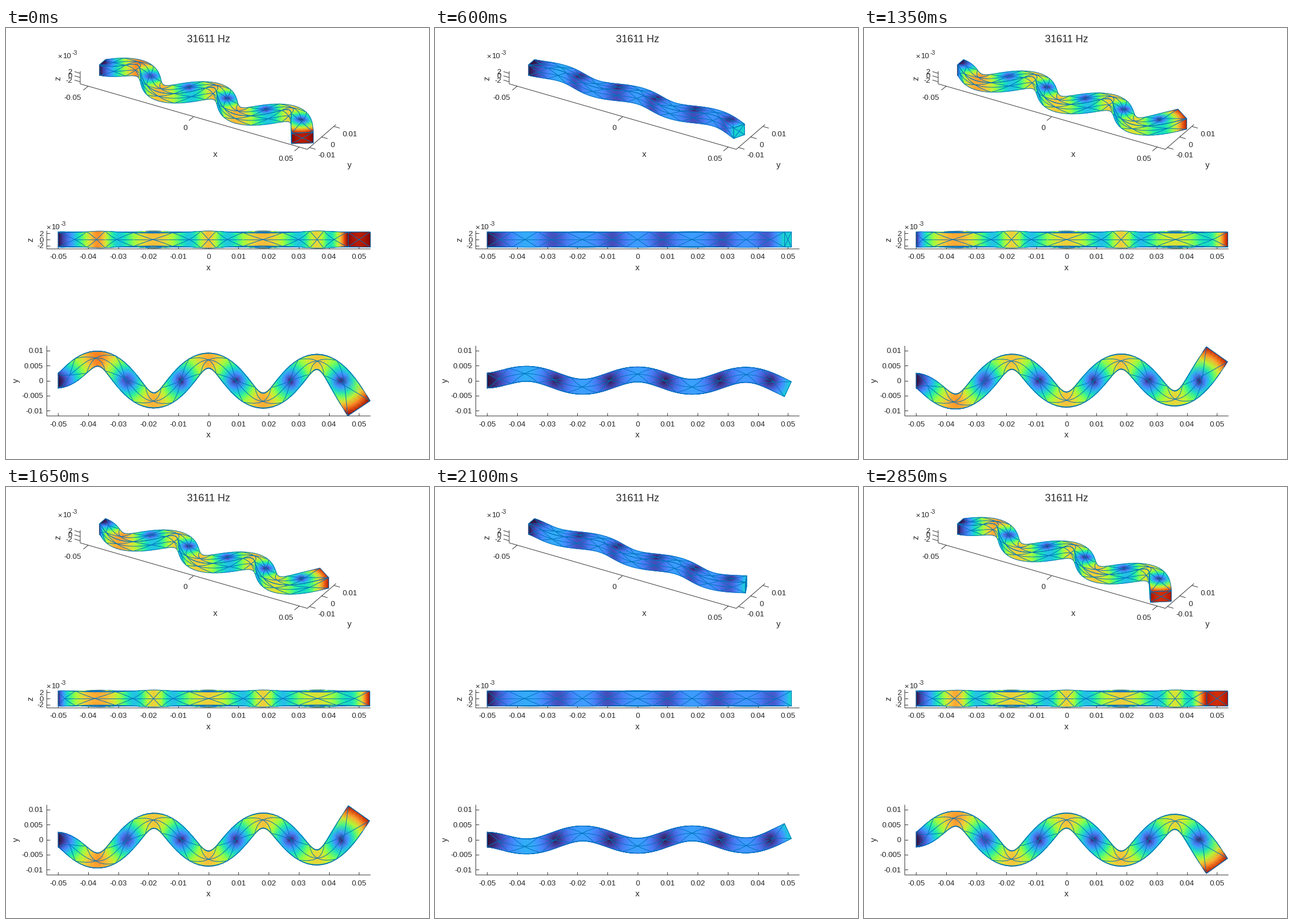
These frames come from a looping animation (741x756 px, 3000 ms). A matplotlib script:

```python
import numpy as np
import matplotlib.pyplot as plt
from matplotlib.animation import FuncAnimation
from matplotlib.collections import LineCollection, TriMesh
from matplotlib.tri import Triangulation

W, H = 741, 756
FRAMES, INTERVAL = 20, 150
PX = 0.72  # points per pixel at 100 dpi
INK = "#262626"
EDGE = "#0072bd"

plt.rcParams["font.family"] = "Liberation Sans"
fig = plt.figure(figsize=(W / 100, H / 100), dpi=100, facecolor="white")
ax = fig.add_axes([0, 0, 1, 1])
ax.set(xlim=(0, W), ylim=(H, 0))
ax.axis("off")

# Beam, in metres
HALF_LEN, HALF = 0.05, 0.0025
CELLS = np.array([-50, -42.4, -32.6, -22.9, -13.8, -4.5,
                  4.5, 13.5, 22.7, 31.8, 40.5, 50]) / 1000
K = 5.5 * np.pi / (2 * HALF_LEN)
AMP, TIP, SHEAR, POISSON = 0.00475, 0.937, 0.93, 0.3
PEAK = 0.01

# Axis limits of the plots
XL, YL, ZL = 0.0538, 0.01175, 0.003

# Views: rows give screen x, screen y (down) and nearness
S2, S3 = 5270, 4270
C, S = np.cos(np.pi / 6), 0.5
VIEWS = [
    (S3 * np.array([[C, S, 0], [S * S, -C * S, -C], [S * C, -C * C, S]]),
     (354, 122.6, 0)),
    (S2 * np.array([[1, 0, 0], [0, 0, -1], [0, -1, 0]]), (354.7, 371, 0)),
    (S2 * np.array([[1, 0, 0], [0, -1, 0], [0, 0, 1]]), (354.7, 618.5, 0)),
]


def deform(x, y, z, c):
    """Displaced point and relative displacement at phase factor c."""
    t = K * (x + HALF_LEN)
    free = TIP * np.exp(-K * (HALF_LEN - x))
    sin, cos, root = np.sin(t), np.cos(t), np.exp(-t)
    defl = AMP * (sin - cos + np.exp(-0.85 * t) - free)
    turn = SHEAR * AMP * K * (cos + sin - root - free)
    bend = SHEAR * AMP * K**2 * (cos - sin + root - free) * (1 - root)
    u = -y * turn
    v = defl + POISSON * bend * (y * y - z * z) / 2
    w = POISSON * bend * y * z
    size = abs(c) * np.sqrt(u * u + v * v + w * w) / PEAK
    return np.array([x + c * u, y + c * v, z + c * w]), size


def project(view, pts):
    m, off = view
    return np.tensordot(m, pts, 1) + np.reshape(off, (3,) + (1,) * (pts.ndim - 1))


def side(k):
    """Long face k as a map from (along, across) to a point of the beam."""
    def surface(p, q):
        y, z = q, np.full_like(q, HALF)
        for _ in range(k):
            y, z = -z, y
        return p, y, z
    return surface


def end_face(p, q):
    return np.full_like(p, HALF_LEN), p, q


def line(p0, q0, p1, q1, n=9):
    f = np.linspace(0, 1, n)
    return p0 + (p1 - p0) * f, q0 + (q1 - q0) * f


def cell_patches(i):
    """(surface, p range, mesh lines) for each face of one cell."""
    a, b = CELLS[i], CELLS[i + 1]
    mid, h = (a + b) / 2, HALF
    first, last = i == 0, i == len(CELLS) - 2
    lines = [line(a, -h, b, h), line(a, h, b, -h),
             line(a, -h, b, -h), line(a, h, b, h),
             line(mid if first else a, 0, mid if last else b, 0)]
    if first:
        lines.append(line(a, -h, a, h))
    if last:
        lines.append(line(b, -h, b, h))
    patches = [(side(k), (a, b), lines) for k in range(4)]
    if last:
        cap = [line(-h, -h, h, h), line(-h, h, h, -h),
               line(-h, -h, h, -h), line(-h, h, h, h),
               line(-h, -h, -h, h), line(h, -h, h, h)]
        patches.append((end_face, (-h, h), cap))
    return patches


NP, NQ = 9, 7
ids = np.arange(NP * NQ).reshape(NP, NQ)
c00, c10, c11, c01 = (g.ravel() for g in
                      (ids[:-1, :-1], ids[1:, :-1], ids[1:, 1:], ids[:-1, 1:]))
TRIS = np.concatenate([np.column_stack([c00, c10, c11]),
                       np.column_stack([c00, c11, c01])])


def cross_up(ax_, ay, bx, by):
    return ay * bx - ax_ * by


def face_fill(surface, span, view, c):
    p, q = np.meshgrid(np.linspace(*span, NP), np.linspace(-HALF, HALF, NQ),
                       indexing="ij")
    pts, size = deform(*surface(p.ravel(), q.ravel()), c)
    sx, sy, _ = project(view, pts)
    a, b, d = TRIS.T
    area = cross_up(sx[b] - sx[a], sy[b] - sy[a], sx[d] - sx[a], sy[d] - sy[a])
    return sx, sy, size, TRIS[area > 0.05]


def face_lines(surface, lines, view, c):
    p = np.array([l[0] for l in lines])
    q = np.array([l[1] for l in lines])

    def at(p, q):
        return project(view, deform(*surface(p, q), c)[0])[:2]

    pm, qm = (p[:, 1:] + p[:, :-1]) / 2, (q[:, 1:] + q[:, :-1]) / 2
    e = 1e-5
    base = at(pm, qm)
    dp, dq = (at(pm + e, qm) - base) / e, (at(pm, qm + e) - base) / e
    front = cross_up(*dp, *dq) > 0.01 * S3**2
    s = at(p, q)
    segs = np.stack([s[:, :, :-1], s[:, :, 1:]], axis=-1)
    return [seg.T for seg in np.moveaxis(segs, 0, 2)[front]]


PATCHES = [cell_patches(i) for i in range(len(CELLS) - 1)]
drawn = []


def draw_cell(i, view, c, z):
    xs, ys, sizes, tris, segs = [], [], [], [], []
    for n, (surface, span, lines) in enumerate(PATCHES[i]):
        sx, sy, size, tri = face_fill(surface, span, view, c)
        xs.append(sx)
        ys.append(sy)
        sizes.append(size)
        tris.append(tri + n * NP * NQ)
        segs += face_lines(surface, lines, view, c)
    tri = np.concatenate(tris)
    if len(tri):
        mesh = TriMesh(Triangulation(np.concatenate(xs), np.concatenate(ys), tri),
                       cmap="turbo", zorder=z)
        mesh.set_array(np.concatenate(sizes))
        mesh.set_clim(0, 1)
        drawn.append(ax.add_collection(mesh, autolim=False))
    if segs:
        edges = LineCollection(segs, colors=EDGE, linewidths=0.95 * PX,
                               capstyle="round", zorder=z + 0.5)
        drawn.append(ax.add_collection(edges, autolim=False))


def update(frame):
    while drawn:
        drawn.pop().remove()
    c = np.cos(2 * np.pi * frame / FRAMES)
    mids = (CELLS[1:] + CELLS[:-1]) / 2
    centre, _ = deform(mids, 0 * mids, 0 * mids, c)
    for view in VIEWS:
        order = np.argsort(project(view, centre)[2], kind="stable")
        for rank, i in enumerate(order):
            draw_cell(i, view, c, 2 + rank)
    return drawn


def text(x, y, s, size=13.33, ha="center", color=INK):
    """Text whose digits are centred on height y."""
    ax.text(x, y + 0.345 * size, s, fontsize=size * PX, ha=ha, va="baseline",
            color=color)


def name(x, y, s, rotation=0):
    ax.text(x, y, s, fontsize=14.67 * PX, ha="center", color=INK,
            va="center" if rotation else "baseline", rotation=rotation)


def stroke(*pts):
    x, y = zip(*pts)
    ax.plot(x, y, color=INK, lw=0.9 * PX, solid_capstyle="butt", zorder=1)


def exponent(x, y):
    text(x, y, "×", ha="left")
    text(x + 9.5, y, "10", ha="left")
    text(x + 24.7, y - 5, "-3", 10.67, ha="left")


def flat_axes(view, lim, ticks, labels, right, below):
    _, (cx, cy, _) = view
    left, bottom = cx - S2 * XL, cy + S2 * lim
    stroke((left, cy - S2 * lim), (left, bottom), (cx + S2 * XL, bottom))
    for n in range(-5, 6):
        x = cx + S2 * n / 100
        stroke((x, bottom), (x, bottom - 5.5))
        text(x, below, f"{n / 100:g}")
    for v, s in zip(ticks, labels):
        y = cy - S2 * v
        stroke((left, y), (left + 5.5, y))
        text(right, y, s, ha="right")
    name(355, below + 24.5, "x")


def solid_axes():
    view = VIEWS[0]

    def at(x, y, z):
        return project(view, np.array([x, y, z]))[:2]

    stroke(at(-XL, -YL, ZL), at(-XL, -YL, -ZL), at(XL, -YL, -ZL),
           at(XL, YL, -ZL))
    for v, s in ((-0.05, "-0.05"), (0, "0"), (0.05, "0.05")):
        x, y = at(v, -YL, -ZL)
        stroke((x, y), (x - 8.5, y + 7))
        text({"-0.05": 117, "0": 314, "0.05": 490}[s], y + 19.3, s)
    for v, s, lx in ((-0.01, "-0.01", 562), (0, "0", 572), (0.01, "0.01", 603)):
        x, y = at(XL, v, -ZL)
        stroke((x, y), (x + 10.5, y + 3))
        text(lx, y + 13.2, s)
    for v, s in ((-0.002, "-2"), (0, "0"), (0.002, "2")):
        x, y = at(-XL, -YL, v)
        stroke((x, y), (x - 10, y - 3))
        text(116, y - 3.3, s, ha="right")
    exponent(90.5, 48.5)
    name(367, 226.5, "x")
    name(602, 244.5, "y")
    name(91, 88, "z", 90)


text(354.5, 18.5, "31611 Hz", 18)
solid_axes()
flat_axes(VIEWS[1], ZL, (-0.002, 0, 0.002), ("-2", "0", "2"), 66, 400.5)
exponent(70.5, 348.5)
name(43, 371, "z", 90)
flat_axes(VIEWS[2], YL, (-0.01, -0.005, 0, 0.005, 0.01),
          ("-0.01", "-0.005", "0", "0.005", "0.01"), 65, 694)
name(18, 618.5, "y", 90)

anim = FuncAnimation(fig, update, frames=FRAMES, interval=INTERVAL,
                     init_func=lambda: update(0), repeat=True, blit=False)
plt.show()
```
